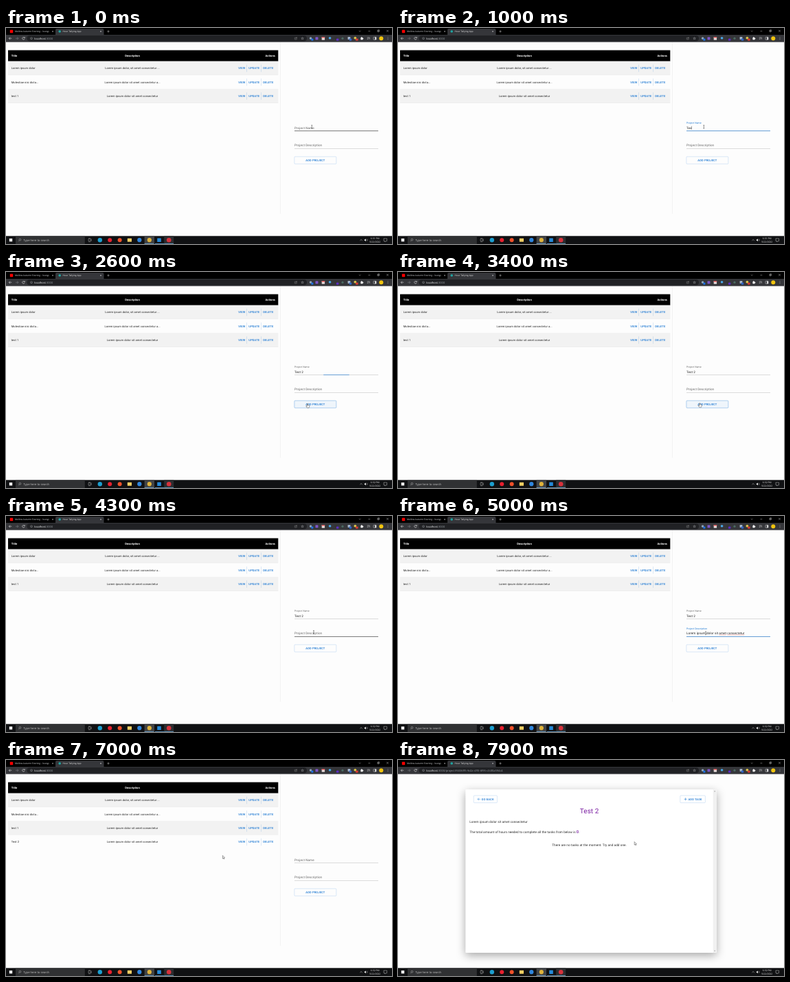
Recreate the animation shown at these times as an HTML page with a canvas. Size 562x316 px, loop 8 s.

```html
<!DOCTYPE html>
<html lang="en">
<head>
<meta charset="utf-8">
<title>Project list</title>
<style>
html, body { margin: 0; width: 100%; height: 100%; overflow: hidden; background: #fdfdfd; }
canvas { display: block; width: 100vw; height: 100vh; }
</style>
</head>
<body>
<canvas id="stage"></canvas>
<script>
const W = 562, H = 316, LOOP = 8000, STEP = 100;
const canvas = document.getElementById('stage');
const c = canvas.getContext('2d');

const BLUE = '#1976d2', INK = 'rgba(0,0,0,.87)', SOFT = 'rgba(0,0,0,.6)', PURPLE = '#7b1fa2';
const UI = '"Open Sans", "Noto Sans", sans-serif', BODY = 'Roboto, Arial, sans-serif';
const S14 = 4.1, S16 = 4.68, S12 = 3.51;

// Moments of the story, in ms
const T = { nameFocus: 300, clock: 1800, nameBlur: 2532, descFocus: 4450, paste: 4900,
            descBlur: 5750, saved: 6100, open: 7600 };
const KEYS = [[700, 'T'], [800, 'Te'], [900, 'Tes'], [1100, 'Test'], [1300, 'Test '], [1500, 'Test 2']];
const LOREM = 'Lorem ipsum dolor sit amet consectetur';
const MOUSE = [[0, 445.3, 144.6], [1700, 445.3, 144.6], [2400, 439, 193.2], [3300, 439, 193.2],
  [4200, 448, 170], [4900, 448, 170], [5600, 450.2, 194], [6200, 450.2, 194],
  [7000, 315.4, 139.7], [7400, 344.2, 119.6], [8000, 344.2, 119.6]];
const ROWS = [
  ['Lorem ipsum dolor', 'Lorem ipsum dolor, sit amet consectetur ...'],
  ['Molestiae nisi dicta...', 'Lorem ipsum dolor sit amet consectetur a...'],
  ['test 1', LOREM],
  ['Test 2', LOREM]
];

const clamp = v => Math.max(0, Math.min(1, v));

// cubic-bezier(0, 0, .2, 1)
function ease(x) {
  x = clamp(x);
  let lo = 0, hi = 1;
  for (let i = 0; i < 20; i++) {
    const m = (lo + hi) / 2;
    if (.6 * (1 - m) * m * m + m * m * m < x) lo = m; else hi = m;
  }
  return 3 * (1 - lo) * lo * lo + lo * lo * lo;
}
const toggle = (t, on, off) => ease((t - on) / 200) - ease((t - off) / 200);

function mouseAt(t) {
  const i = Math.max(1, MOUSE.findIndex(k => k[0] > t));
  const [t0, x0, y0] = MOUSE[i - 1], [t1, x1, y1] = MOUSE[i];
  const p = clamp((t - t0) / (t1 - t0)), s = p * p * (3 - 2 * p);
  return { x: x0 + (x1 - x0) * s, y: y0 + (y1 - y0) * s };
}
const over = (m, x, y, w, h) => m.x >= x && m.x <= x + w && m.y >= y && m.y <= y + h;

function rect(x, y, w, h, fill) { c.fillStyle = fill; c.fillRect(x, y, w, h); }
function round(x, y, w, h, r, fill, stroke, lw = .3) {
  c.beginPath(); c.roundRect(x, y, w, h, r);
  if (fill) { c.fillStyle = fill; c.fill(); }
  if (stroke) { c.strokeStyle = stroke; c.lineWidth = lw; c.stroke(); }
}
function dot(x, y, r, fill) { c.beginPath(); c.arc(x, y, r, 0, 7); c.fillStyle = fill; c.fill(); }
function ring(x, y, r, color, lw = .4, a = 0, b = 7) {
  c.beginPath(); c.arc(x, y, r, a, b); c.strokeStyle = color; c.lineWidth = lw; c.stroke();
}
function line(pts, color, lw = .4) {
  c.beginPath();
  for (let i = 0; i < pts.length; i += 2) c.lineTo(pts[i], pts[i + 1]);
  c.strokeStyle = color; c.lineWidth = lw; c.stroke();
}
// y is the middle of the text line; returns the width
function text(s, x, y, size, color, { font = BODY, weight = 400, align = 'left', gap = .0094 } = {}) {
  c.font = `${weight} ${size}px ${font}`;
  c.letterSpacing = size * gap + 'px';
  c.textAlign = align;
  c.fillStyle = color;
  c.fillText(s, x, y + size * .342);
  return c.measureText(s).width;
}
const uiText = (s, x, y, size, color, align = 'left') => text(s, x, y, size, color, { font: UI, align, gap: 0 });
const btnText = (s, x, y, align = 'center') => text(s, x, y, S14, BLUE, { weight: 500, align, gap: .0286 });
const close = (x, y, r, color) => {
  line([x - r, y - r, x + r, y + r], color);
  line([x + r, y - r, x - r, y + r], color);
};
const plus = (x, y, r, color, lw) => {
  line([x - r, y, x + r, y], color, lw);
  line([x, y - r, x, y + r], color, lw);
};

function drawBrowser(t) {
  rect(0, 0, W, 10.2, '#000');
  rect(0, 10, W, 10.6, '#35363a');
  round(72, 1, 70.5, 10, [2, 2, 0, 0], '#35363a');

  round(5.8, 2.8, 4.4, 4.4, .6, '#f00');
  c.save();
  c.beginPath(); c.rect(12, 0, 50.5, 10); c.clip();
  uiText('Mellow Autumn Evening - lounge', 13, 5, 3.3, '#d5d7da');
  c.restore();
  close(68, 5, 1, '#ddd');
  dot(78.2, 5, 1.8, '#1fa8a4');
  uiText('Hour Tallying App', 82.5, 5, 3.3, '#eee');
  close(138, 5, 1, '#eee');
  plus(149, 5, 1.6, '#eee', .45);

  line([513.8, 4, 515.2, 5.2, 516.6, 4], '#ddd');
  line([527.5, 4.6, 530.3, 4.6], '#eee');
  round(540.9, 3.4, 2.2, 2.2, .2, null, '#eee', .4);
  round(541.6, 2.7, 2.2, 2.2, .2, null, '#eee', .3);
  close(555.5, 4.3, 1.4, '#eee');

  const arrow = (x, d, col) => {
    line([x - 2, 15.2, x + 2, 15.2], col, .55);
    line([x + d * .2, 13.4, x + d * 2, 15.2, x + d * .2, 17], col, .55);
  };
  arrow(6.3, -1, '#eee');
  arrow(16, 1, '#85878b');
  ring(25.5, 15.2, 1.8, '#eee', .55, .4, 5.6);
  line([27.4, 12.9, 27.4, 14.6, 25.7, 14.6], '#eee', .5);

  round(30.5, 11.1, 407.5, 8.3, 4.1, '#202124');
  ring(37, 15.2, 1.5, '#c5c7ca', .35);
  line([37, 14.9, 37, 16.1], '#c5c7ca', .4);
  const w = uiText('localhost', 41.2, 15.2, 4, '#f1f3f4');
  const path = t >= T.open ? '/project/f6036ff5-9d2c-4ff3-8f95-c34f0a594c4' : '';
  uiText(':3000' + path, 41.2 + w, 15.2, 4, '#9aa0a6');

  round(420.3, 14, 3, 2.8, .3, null, '#aaa', .35);
  line([421.5, 15.5, 423.9, 13.2], '#aaa', .4);
  c.beginPath();
  for (let i = 0; i < 10; i++) {
    const a = i * Math.PI / 5 - Math.PI / 2, r = i % 2 ? .8 : 1.9;
    c.lineTo(431.6 + r * Math.cos(a), 15.3 + r * Math.sin(a));
  }
  c.closePath(); c.strokeStyle = '#c5c7ca'; c.lineWidth = .35; c.stroke();

  dot(443.6, 15, 1.8, '#8ea6bd');
  round(444.4, 15.6, 3, 2.8, .5, '#1a73e8');
  round(450.5, 13.2, 4, 4, .6, '#7d55c7');
  round(459.7, 13.1, 4.4, 4.4, .5, '#e8dedd');
  rect(459.7, 13.1, 4.4, 1.4, '#e25050');
  dot(471.6, 14.8, 1.8, '#4aa8e8');
  dot(480.2, 14.8, 1.7, '#333');
  round(481, 15.4, 3.4, 3, .5, '#5b2bc4');
  dot(490, 15.2, 1.6, '#4b6b62');
  round(497.6, 13, 3.8, 3.8, .5, '#a5b6cc');
  round(499.8, 15.6, 3.4, 3, .5, '#2f64c8');
  dot(508.4, 14.6, 1.9, '#d7c04a');
  round(509.2, 15.6, 3.4, 3, .5, '#df3a31');
  round(516.4, 14, 3.2, 3.2, .4, '#eee');
  dot(517.8, 13.8, .8, '#eee');
  dot(519.8, 15.5, .7, '#eee');
  for (const y of [13.8, 15.1, 16.4]) line([525.8, y, y > 16 ? 527.6 : 529, y], '#eee');
  line([529.6, 13.6, 529.6, 16.7], '#eee');
  round(535, 13.3, 4, 3.8, .4, null, '#eee', .45);
  rect(537.3, 13.3, 1.7, 3.8, '#eee');
  dot(546.3, 15.2, 3, '#f1c40f');
  for (const y of [13.6, 15.2, 16.8]) dot(556, y, .42, '#eee');
}

function drawTaskbar(t) {
  rect(0, 304.3, W, 11.7, '#101113');
  rect(4.8, 308, 4.4, 4.4, '#fff');
  rect(14, 304.6, 100.8, 11.4, '#303133');
  ring(20.4, 309.7, 1.4, '#ddd', .4);
  line([19.4, 310.8, 18.2, 312.2], '#ddd', .4);
  uiText('Type here to search', 25.3, 310.2, 4.15, '#c9c9c9');
  round(120, 308.6, 3.2, 3.2, 0, null, '#ddd', .4);
  line([124.2, 308.4, 124.2, 312], '#ddd', .4);
  line([120, 307.6, 123.2, 307.6], '#ddd', .3);
  line([120, 312.8, 123.2, 312.8], '#ddd', .3);

  rect(201.6, 304.3, 14.4, 11.7, '#414346');
  rect(230.2, 304.3, 14, 11.7, '#2b2d30');
  dot(136.8, 310.2, 3.2, '#1c9fd0');
  dot(151.2, 310.2, 3, '#e8202f');
  dot(165.6, 310.2, 3, '#f0512a');
  round(176.8, 307.7, 6.2, 5, .4, '#f5cf63');
  dot(194.3, 310.2, 3.1, '#2f86dd');
  dot(208.8, 310.2, 3.1, '#e0b33a');
  round(220.2, 307.4, 5.6, 5.6, .5, '#2489d8');
  dot(237.2, 310.2, 3.3, '#d8323c');
  for (const x of [201.6, 216.8, 230.4]) rect(x, 315.3, 13.6, .7, '#76b9ed');

  line([515.4, 311, 517.1, 309.4, 518.8, 311], '#eee', .45);
  c.beginPath();
  [[521.8, 309.4], [522.7, 309.4], [524, 308.2], [524, 312.2], [522.7, 311], [521.8, 311]].forEach(p => c.lineTo(...p));
  c.fillStyle = '#eee'; c.fill();
  ring(524, 310.2, 1.3, '#eee', .35, -.8, .8);
  ring(524, 310.2, 2.3, '#bbb', .35, -.8, .8);
  uiText(t < T.clock ? '6:31 PM' : '6:32 PM', 537.2, 307.4, 3.4, '#f2f2f2', 'center');
  uiText('5/22/2022', 537.2, 312.8, 3.4, '#f2f2f2', 'center');
  line([550, 308, 554.6, 308, 554.6, 311.8, 552.8, 311.8, 551.8, 313, 551.8, 311.8, 550, 311.8, 550, 307.8], '#eee', .4);
}

function drawTable(t, m) {
  rect(3, 32.5, 393.3, 16.2, '#000');
  const head = { weight: 700, gap: .0107 };
  text('Title', 7.7, 40.6, S14, '#fff', head);
  text('Description', 184, 40.6, S14, '#fff', { ...head, align: 'center' });
  text('Actions', 391.9, 40.6, S14, '#fff', { ...head, align: 'right' });

  ROWS.slice(0, t < T.saved ? 3 : 4).forEach(([title, desc], i) => {
    const top = 48.7 + i * 20.35, y = top + 10.2;
    rect(3, top, 393.3, 20.35, i % 2 ? '#fdfdfd' : '#f2f2f2');
    if (i < 3) rect(3, top + 20.1, 393.3, .29, '#e0e0e0');
    text(title, 7.7, y, S14, INK, { gap: .0107 });
    text(desc, 184, y, S14, INK, { gap: .0107, align: 'center' });
    if (over(m, 335.6, y - 5.3, 15, 10.6)) round(335.6, y - 5.3, 15, 10.6, 1, 'rgba(25,118,210,.05)');
    btnText('VIEW', 343.3, y);
    btnText('UPDATE', 361.3, y);
    btnText('DELETE', 381.8, y);
    for (const x of [350.6, 371.7]) rect(x, y - 5.3, .3, 10.6, 'rgba(25,118,210,.5)');
  });
}

const FIELD = { x: 420, w: 122, h: 9.4 };
function drawField(t, m, label, value, y, on, off) {
  const { x, w, h } = FIELD, base = y + 4.6;
  const focused = t >= on && t < off;
  const raised = toggle(t, on, T.saved), bar = toggle(t, on, off);
  text(label, x, y - raised * 7.3, S16 + (S12 - S16) * raised, focused ? BLUE : SOFT);

  const hover = over(m, x, base - h, w, h) && !focused;
  rect(x, base - (hover ? .3 : 0), w, hover ? .59 : .3, hover ? INK : 'rgba(0,0,0,.45)');
  if (bar > 0) rect(x + w * (1 - bar) / 2, base - .3, w * bar, .6, BLUE);

  const tw = value ? text(value, x, y, S16, INK) : 0;
  if (value === LOREM) {
    let start = x + c.measureText('Lorem ipsum dolor sit ').width;
    for (const word of ['amet', 'consectetur']) {
      const len = c.measureText(word).width, pts = [];
      for (let d = 0; d <= len; d += .5) pts.push(start + d, y + 2.3 + (d % 1 ? .2 : -.2));
      line(pts, '#e53935', .35);
      start += c.measureText(word + ' ').width;
    }
  }
  const idle = (t - on) % 1000 < 500 || (t > 700 && t < 1600);
  if (focused && idle) rect(x + tw + .1, y - 2.4, .35, 4.8, '#000');
}

const ADD = [419.9, 188.2, 61, 10.7];
function drawForm(t, m) {
  rect(399.3, 20.6, .35, 251, '#dcdcdc');
  let name = '';
  for (const [at, s] of KEYS) if (t >= at) name = s;
  const done = t >= T.saved;
  drawField(t, m, 'Project Name', done ? '' : name, 146, T.nameFocus, T.nameBlur);
  drawField(t, m, 'Project Description', done || t < T.paste ? '' : LOREM, 171.7, T.descFocus, T.descBlur);
  const hover = over(m, ...ADD);
  round(...ADD, 1.17, hover ? 'rgba(25,118,210,.06)' : null, hover ? BLUE : 'rgba(25,118,210,.5)', .32);
  btnText('ADD PROJECT', 450.4, 193.5);
}

function drawDetail(k) {
  c.save();
  c.shadowColor = 'rgba(0,0,0,.34)'; c.shadowBlur = 13 * k; c.shadowOffsetY = 4 * k;
  round(98.3, 43, 365.4, 239, .8, '#fff');
  c.restore();
  rect(458.8, 43.2, 4.9, 238.6, '#f1f1f1');
  for (const [y, d] of [[45.7, -1], [279.3, 1]]) {
    c.beginPath();
    c.moveTo(460.1, y - d * .5); c.lineTo(462.3, y - d * .5); c.lineTo(461.2, y + d * .7);
    c.fillStyle = '#8a8a8a'; c.fill();
  }
  const edge = 'rgba(25,118,210,.5)';
  round(110.2, 52, 34.2, 10.6, 1.17, null, edge, .32);
  line([116, 57.3, 119.8, 57.3], BLUE, .5);
  line([117.9, 55.4, 116, 57.3, 117.9, 59.2], BLUE, .5);
  btnText('GO BACK', 121.6, 57.4, 'left');
  round(410.8, 52, 36.6, 10.6, 1.17, null, edge, .32);
  plus(418.6, 57.3, 2, BLUE, .55);
  btnText('ADD TASK', 422.5, 57.4, 'left');

  text('Test 2', 278.6, 74.5, 9.95, PURPLE, { align: 'center', gap: .0073 });
  text(LOREM, 104.2, 90.6, S16, INK);
  const w = text('The total amount of hours needed to complete all the tasks from below is ', 104.2, 105.6, S16, INK);
  const n = text('0', 104.2 + w, 105.3, 5.85, PURPLE, { weight: 500 });
  text('.', 104.2 + w + n, 105.6, S16, INK);
  text('There are no tasks at the moment. Try and add one.', 278.5, 124.2, S16, INK, { align: 'center' });
}

function shape(pts, x, y) {
  c.beginPath();
  for (let i = 0; i < pts.length; i += 2) c.lineTo(x + pts[i], y + pts[i + 1]);
  c.closePath();
  c.fillStyle = '#fff'; c.fill();
  c.strokeStyle = '#111'; c.lineWidth = .4; c.lineJoin = 'round'; c.stroke();
}
function drawMouse(t, m) {
  const { x, w, h } = FIELD, live = t < T.open;
  if (live && (over(m, x, 141.2, w, h) || over(m, x, 166.9, w, h))) {
    line([m.x, m.y - 2.4, m.x, m.y + 2.4], '#111', .45);
    for (const d of [-2.4, 2.4]) line([m.x - .9, m.y + d, m.x + .9, m.y + d], '#111', .4);
  } else if (live && (over(m, ...ADD) || over(m, 335.6, 114.6, 15, 10.6))) {
    shape([-.5, 0, .4, 0, .5, 2, 2.5, 2.4, 2.9, 3, 2.7, 4.8, 2.1, 6, -.6, 6, -2, 3.9, -2, 3.2, -1.2, 3.1, -.5, 3.8], m.x, m.y - .5);
  } else {
    shape([0, 0, 0, 4.6, 1.05, 3.7, 1.75, 5.2, 2.45, 4.9, 1.8, 3.4, 3.2, 3.3], m.x, m.y);
  }
}

function draw(t) {
  const k = window.devicePixelRatio || 1;
  const pw = Math.round(innerWidth * k), ph = Math.round(innerHeight * k);
  if (canvas.width !== pw || canvas.height !== ph) { canvas.width = pw; canvas.height = ph; }
  c.setTransform(pw / W, 0, 0, ph / H, 0, 0);
  c.textRendering = 'geometricPrecision';
  rect(0, 0, W, H, '#fdfdfd');
  const m = mouseAt(t);
  if (t < T.open) {
    drawTable(t, m);
    drawForm(t, m);
  } else {
    drawDetail(pw / W);
  }
  drawBrowser(t);
  drawTaskbar(t);
  drawMouse(t, m);
}

const begin = performance.now();
function tick() {
  const t = (performance.now() - begin) % LOOP;
  draw(Math.floor(t / STEP) * STEP);
  requestAnimationFrame(tick);
}
tick();
</script>
</body>
</html>
```
